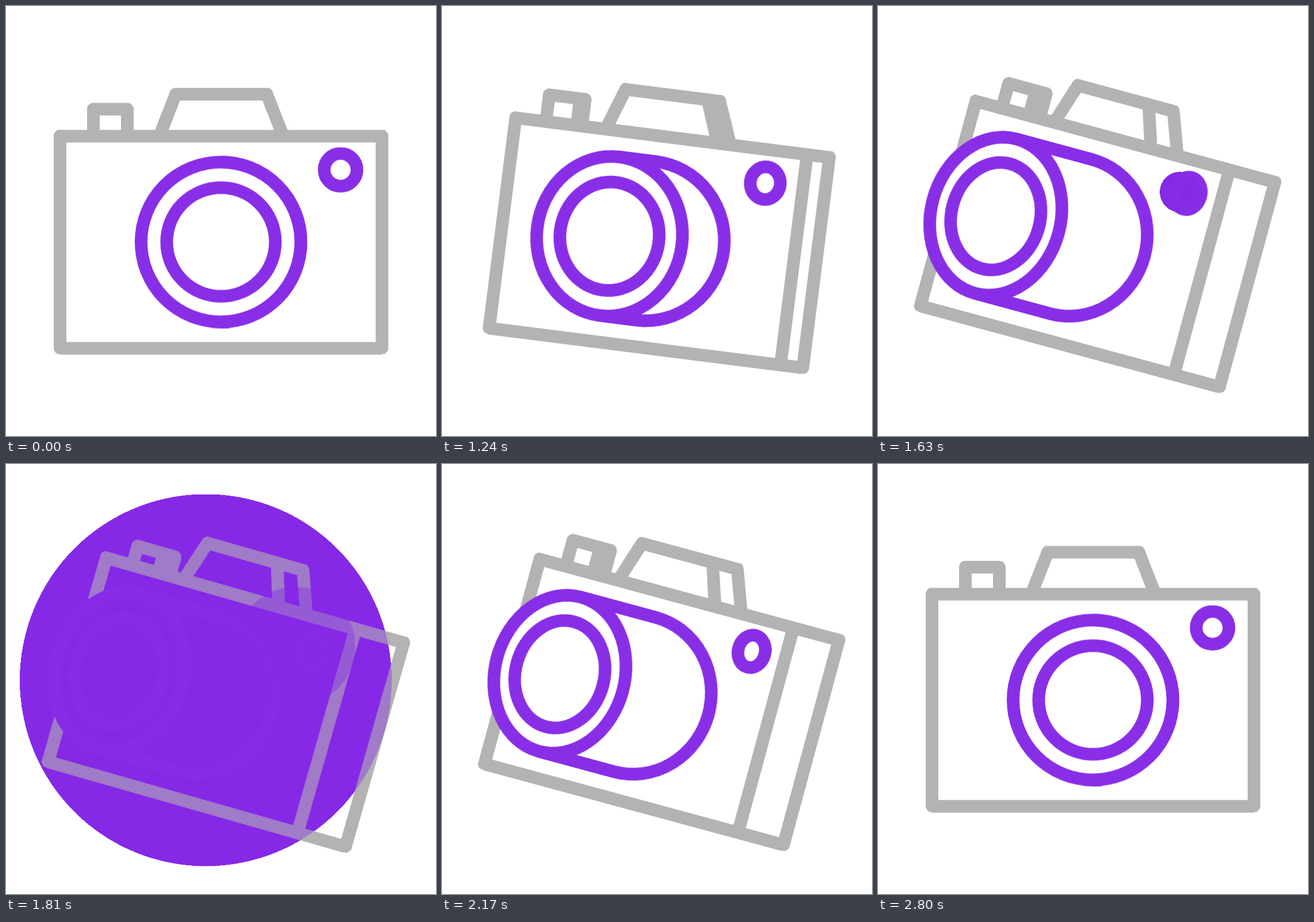
An HTML page without scripts that plays this animation: 748x748 px, repeating every 2.83 s.

```html
<!DOCTYPE html>
<html lang="en">
<head>
<meta charset="utf-8">
<title>Camera</title>
<style>
html, body { margin: 0; width: 100%; height: 100%; overflow: hidden; background: #fff; }
svg { display: block; width: 100vw; height: 100vh; }

/* every part shares one clock: rest, turn, turn back */
.turn, .morph, .oval, .press, .disc { animation: 2830ms linear infinite; }
.turn { animation-name: turn; }
.morph { animation-name: morph; d: var(--a); }
.oval { animation-name: oval; }
.press { animation-name: press; }
.disc { animation-name: flash; fill: #862ae6; r: 0; }
.late { animation-delay: 120ms; }
.veil { opacity: .4; }

.grey, .purple { fill: none; stroke-width: 22; stroke-linejoin: round; }
.grey { stroke: #b3b3b3; }
.purple { stroke: #892ee7; }
.grey, .disc { shape-rendering: crispEdges; }

@keyframes turn {
  0% { transform: translateY(0) rotate(0deg); }
  35.336% { transform: translateY(0) rotate(0deg); animation-timing-function: cubic-bezier(.274, 0, .164, 1); }
  67.138% { transform: translateY(1px) rotate(16deg); animation-timing-function: cubic-bezier(.836, 0, .726, 1); }
  98.94%, 100% { transform: translateY(0) rotate(0deg); }
}
@keyframes morph {
  0% { d: var(--a); }
  35.336% { d: var(--a); animation-timing-function: cubic-bezier(.274, 0, .164, 1); }
  67.138% { d: var(--b); animation-timing-function: cubic-bezier(.836, 0, .726, 1); }
  98.94%, 100% { d: var(--a); }
}
@keyframes oval {
  0% { cx: var(--x); rx: var(--r); }
  35.336% { cx: var(--x); rx: var(--r); animation-timing-function: cubic-bezier(.274, 0, .164, 1); }
  67.138% { cx: var(--x2); rx: var(--r2); animation-timing-function: cubic-bezier(.836, 0, .726, 1); }
  98.94%, 100% { cx: var(--x); rx: var(--r); }
}
@keyframes press {
  0%, 55.5% { transform: translateY(0); animation-timing-function: ease-in-out; }
  62.9%, 65% { transform: translateY(12.5px); animation-timing-function: ease-in-out; }
  72.5%, 100% { transform: translateY(0); }
}
@keyframes flash {
  0%, 56.537% { cx: 162px; cy: -83.5px; r: 0; }
  59.717% { cx: 131px; cy: -93.5px; r: 102px; }
  63.958%, 68.905% { cx: -26.5px; cy: -34.5px; r: 323.5px; }
  68.906%, 100% { cx: 162px; cy: -83.5px; r: 0; }
}

.body {
  --a: path("M-280 -184.5H280V184.5H-280Z");
  --b: path("M-260.3 -184.5H278V184.5H-260.3Z");
}
.edge {
  --a: path("M280 -184.5V184.5");
  --b: path("M191 -184.5V184.5");
}
.prism {
  --a: path("M-107 -184.5L-78.5 -257.5L79.5 -257.5L108 -184.5");
  --b: path("M-120.2 -184.5L-97.6 -257.5L74.8 -257.5L102 -184.5");
}
.prism-edge {
  --a: path("M79.5 -257.5L108 -184.5");
  --b: path("M27.8 -257.5L51.5 -184.5");
}
.button {
  --a: path("M-222 -188V-231H-163V-188");
  --b: path("M-213.3 -188V-231H-145.4V-188");
}
.button-edge {
  --a: path("M-163 -231V-188");
  --b: path("M-165.6 -231V-188");
}
.barrel {
  --a: path("M0 -139L0 -139A139 139 0 0 1 0 139L0 139");
  --b: path("M-185 -139L-42 -139A132 139 0 0 1 -42 139L-185 139");
}
.rim { --x: 0px; --r: 139px; --x2: -185px; --r2: 111.6px; }
.glass { --x: 0px; --r: 94.5px; --x2: -185px; --r2: 76.3px; }
.lamp { --x: 208px; --r: 28.5px; --x2: 132.5px; --r2: 23.2px; }
.shade { --x: 0px; --r: 139px; --x2: -185px; --r2: 114.5px; }
</style>
</head>
<body>
<svg viewBox="-374 -410.5 748 748">
  <mask id="behind" maskUnits="userSpaceOnUse" x="-600" y="-600" width="1200" height="1200">
    <rect x="-600" y="-600" width="1200" height="1200" fill="#fff"/>
    <g fill="#000" stroke="#000" stroke-width="20">
      <ellipse class="oval shade" ry="125"/>
      <path class="morph barrel"/>
    </g>
  </mask>

  <circle class="disc"/>
  <circle class="disc late"/>

  <g class="turn">
    <g class="grey" mask="url(#behind)">
      <path class="morph body"/>
      <path class="morph edge"/>
      <path class="morph prism"/>
      <path class="morph prism-edge"/>
      <g class="press">
        <path class="morph button"/>
        <path class="morph button-edge"/>
      </g>
    </g>
    <g class="purple">
      <path class="morph barrel"/>
      <ellipse class="oval rim" ry="139"/>
      <ellipse class="oval glass" ry="94.5"/>
      <ellipse class="oval lamp" cy="-125.5" ry="28.5"/>
    </g>
  </g>

  <circle class="disc veil"/>
  <circle class="disc late veil"/>
</svg>
</body>
</html>
```
